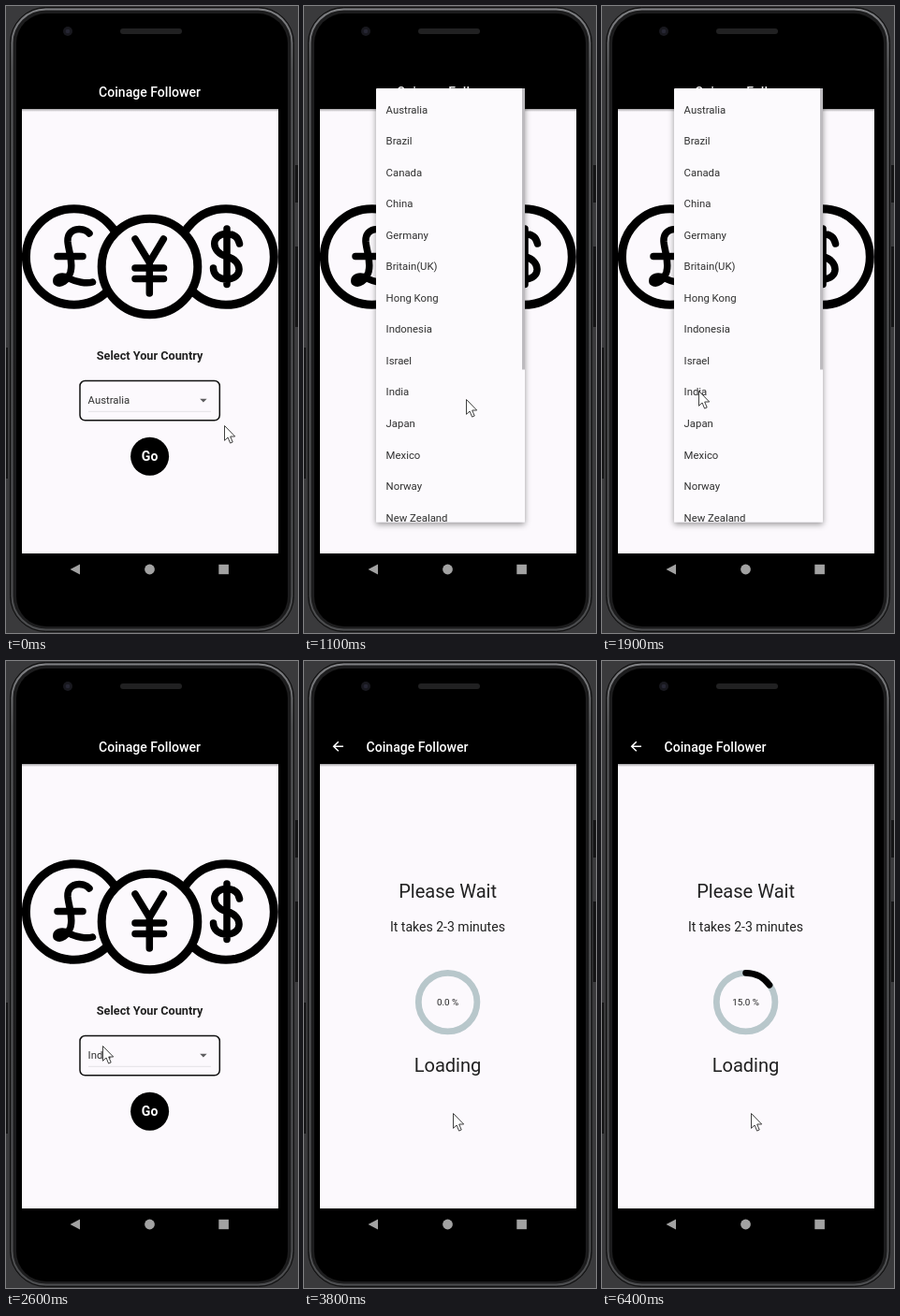
Recreate the animation shown at these times as an HTML page. Size 312 px wide and 670 px high, loop 8 s.

```html
<!DOCTYPE html>
<html lang="en">
<head>
<meta charset="utf-8">
<title>Coinage Follower</title>
<style>
  html, body { margin: 0; width: 100%; height: 100%; overflow: hidden; background: #3a3a3c; }
  svg { display: block; width: 100%; height: 100%; }
  text { font-family: Roboto, Arial, sans-serif; fill: #212121; }
  .mid { text-anchor: middle; }
  .title { font-size: 14.05px; font-weight: 500; fill: #fff; }
  .head { font-size: 20.07px; }
  .item { font-size: 11.35px; fill: #303030; }
  .coin { fill: #fcf9fd; stroke: #000; stroke-width: 9; }
  .sign { fill: none; stroke: #000; stroke-width: 7.5; stroke-linecap: round; stroke-linejoin: round; }
</style>
</head>
<body>
<svg viewBox="0 0 312 670">
  <defs>
    <linearGradient id="rim" x2="0" y2="1">
      <stop offset="0" stop-color="#808184"/>
      <stop offset=".1" stop-color="#58595b"/>
      <stop offset="1" stop-color="#4c4d4f"/>
    </linearGradient>
    <linearGradient id="barShade" x2="0" y2="1">
      <stop offset="0" stop-color="#000" stop-opacity=".35"/>
      <stop offset="1" stop-color="#000" stop-opacity="0"/>
    </linearGradient>
    <filter id="lift" x="-20%" y="-10%" width="140%" height="120%">
      <feDropShadow dx="0" dy="2.5" stdDeviation="3" flood-opacity=".4"/>
    </filter>
    <clipPath id="page"><rect x="17" y="55" width="274" height="530"/></clipPath>
    <clipPath id="list"><rect x="77" y="88" width="159" height="463.5"/></clipPath>
  </defs>

  <!-- phone -->
  <rect width="312" height="670" fill="#3a3a3c"/>
  <path d="M0 365h2v140h-2zM309 170h3v40h-3zM309 257h3v86h-3z" fill="#141415"/>
  <rect x="4.5" y="1.5" width="303" height="667" rx="38" fill="#1c1c1d" stroke="#111"/>
  <rect x="6.5" y="3.5" width="299" height="663" rx="36" fill="none" stroke="url(#rim)" stroke-width="2"/>
  <rect x="11" y="8" width="290" height="655" rx="32"/>
  <circle cx="66" cy="27" r="5" fill="#18181e"/>
  <circle cx="66" cy="27" r="2.3" fill="#262633"/>
  <rect x="122" y="24" width="66" height="6" rx="3" fill="#212122"/>
  <g fill="#a2a2a2">
    <path d="M68.5 602l10.5-5.6v11.2z"/>
    <circle cx="153.5" cy="602" r="5.4"/>
    <rect x="227.3" y="596.8" width="10.6" height="10.4"/>
  </g>
  <rect x="17" y="110" width="274" height="475" fill="#fcf9fd"/>

  <g clip-path="url(#page)">
    <g id="home">
      <text class="title mid" x="153.5" y="96.5">Coinage Follower</text>
      <circle class="coin" cx="72.7" cy="268" r="51.3"/>
      <circle class="coin" cx="235" cy="268" r="51.3"/>
      <circle class="coin" cx="153.5" cy="278.5" r="51.3"/>
      <g class="sign">
        <path d="M89 243C83 236 65 236 66 252C67 263 72 273 69 284C66 294 58 298 54 295C53 290 59 287 67 291C75 295 86 297 92.5 295M55 267.5H82"/>
        <path d="M138 249L153.3 274L168.3 249M153.3 274V307M138 280H168.5M138 291.5H168.5"/>
        <path d="M249.5 254C248 246 242 243.5 235.5 243.5C219 243.5 218 263 235.5 267.5C254 272 253 292 236 292C227 292 221.5 287 221.5 280M236 238V297.5"/>
      </g>
      <text class="mid" x="153.6" y="377.5" font-size="12.7" font-weight="700">Select Your Country</text>
      <rect x="79" y="400.5" width="149.3" height="42.3" rx="5.5" fill="none" stroke="#111" stroke-width="1.5"/>
      <path d="M88 433.3H219" stroke="#dedce0" stroke-width=".8"/>
      <path d="M207.2 419.8h7.4l-3.7 3.8z" fill="#5c5c5e"/>
      <text class="item" id="choice" x="87.6" y="425.2"></text>
      <circle cx="153.6" cy="481.2" r="20.5"/>
      <text class="mid" x="153.6" y="486.4" font-size="14.05" font-weight="700" style="fill:#fff">Go</text>
    </g>

    <g id="wait">
      <rect x="17" y="75" width="275" height="35"/>
      <rect x="17" y="110" width="275" height="475" fill="#fcf9fd"/>
      <path d="M42 91.3H32M36.8 86.3L31.7 91.3L36.8 96.3" fill="none" stroke="#fff" stroke-width="1.5"/>
      <text class="title" x="66.6" y="96.5">Coinage Follower</text>
      <text class="head mid" x="153.6" y="252.8">Please Wait</text>
      <text class="mid" x="153.4" y="288.5" font-size="14.05">It takes 2-3 minutes</text>
      <g fill="none" stroke-width="6.8">
        <circle cx="153.6" cy="364.6" r="31.3" stroke="#b8c7cb"/>
        <path id="arc" stroke="#000" stroke-linecap="round"/>
      </g>
      <text class="mid" id="percent" x="153.6" y="368" font-size="9.8"></text>
      <text class="head mid" x="153.5" y="438.8">Loading</text>
    </g>
    <rect x="17" y="110" width="275" height="3" fill="url(#barShade)"/>
  </g>

  <g id="menu">
    <rect x="77" y="88" width="159" height="463.5" rx="1" fill="#fcfafd" filter="url(#lift)"/>
    <g id="rows" clip-path="url(#list)"></g>
    <rect x="233" y="88" width="3" height="300.5" fill="#bdbbbf"/>
  </g>

  <path id="cursor" d="M0 0V15.8L3.6 12.5L6.1 18.6L8.7 17.5L6.2 11.5H11.2Z" fill="#fff" stroke="#2c2c2c" stroke-width=".9" stroke-linejoin="round"/>
</svg>
<script>
const LOOP = 8000, STEP = 100;
const $ = id => document.getElementById(id);
const COUNTRIES = ['Australia', 'Brazil', 'Canada', 'China', 'Germany', 'Britain(UK)', 'Hong Kong',
  'Indonesia', 'Israel', 'India', 'Japan', 'Mexico', 'Norway', 'New Zealand'];

// Pointer stops: time, x, y
const POINTER = [
  [0, 233.5, 448.5], [300, 173.5, 420.5], [1300, 173.5, 420.5], [1500, 135, 409],
  [1600, 135, 409], [1700, 126, 406], [1900, 103.5, 411.5],
  [2800, 103.5, 411.5], [3200, 159.5, 483.5], [LOOP, 159.5, 483.5]
];

COUNTRIES.forEach((name, i) => {
  const row = document.createElementNS('http://www.w3.org/2000/svg', 'text');
  row.setAttribute('class', 'item');
  row.setAttribute('x', 87.6);
  row.setAttribute('y', 114.7 + 33.53 * i);
  row.textContent = name;
  $('rows').append(row);
});

const clamp = v => Math.max(0, Math.min(1, v));
const show = (id, on) => $(id).setAttribute('visibility', on ? 'visible' : 'hidden');

function pointerAt(t) {
  const i = POINTER.findIndex(p => p[0] > t);
  const [t0, x0, y0] = POINTER[i - 1], [t1, x1, y1] = POINTER[i];
  const k = (t - t0) / (t1 - t0);
  return [x0 + (x1 - x0) * k, y0 + (y1 - y0) * k];
}

function arcPath(part) {
  if (!part) return '';
  const a = part * 2 * Math.PI, r = 31.3;
  return `M153.6 ${364.6 - r}A${r} ${r} 0 0 1 ${153.6 + r * Math.sin(a)} ${364.6 - r * Math.cos(a)}`;
}

function draw(now) {
  const t = Math.floor((now % LOOP) / STEP) * STEP;
  $('choice').textContent = t < 2600 ? 'Australia' : 'India';
  show('menu', t >= 1100 && t < 2600);
  show('home', t < 3800);
  show('wait', t >= 3700);
  $('wait').setAttribute('opacity', t < 3800 ? 0.6 : 1);
  $('arc').setAttribute('d', arcPath(0.15 * clamp((t - 6000) / 400)));
  $('percent').textContent = t < 6100 ? '0.0 %' : '15.0 %';
  $('cursor').setAttribute('transform', `translate(${pointerAt(t)})`);
}

const start = performance.now();
function tick() {
  draw(performance.now() - start);
  requestAnimationFrame(tick);
}
tick();
</script>
</body>
</html>
```
